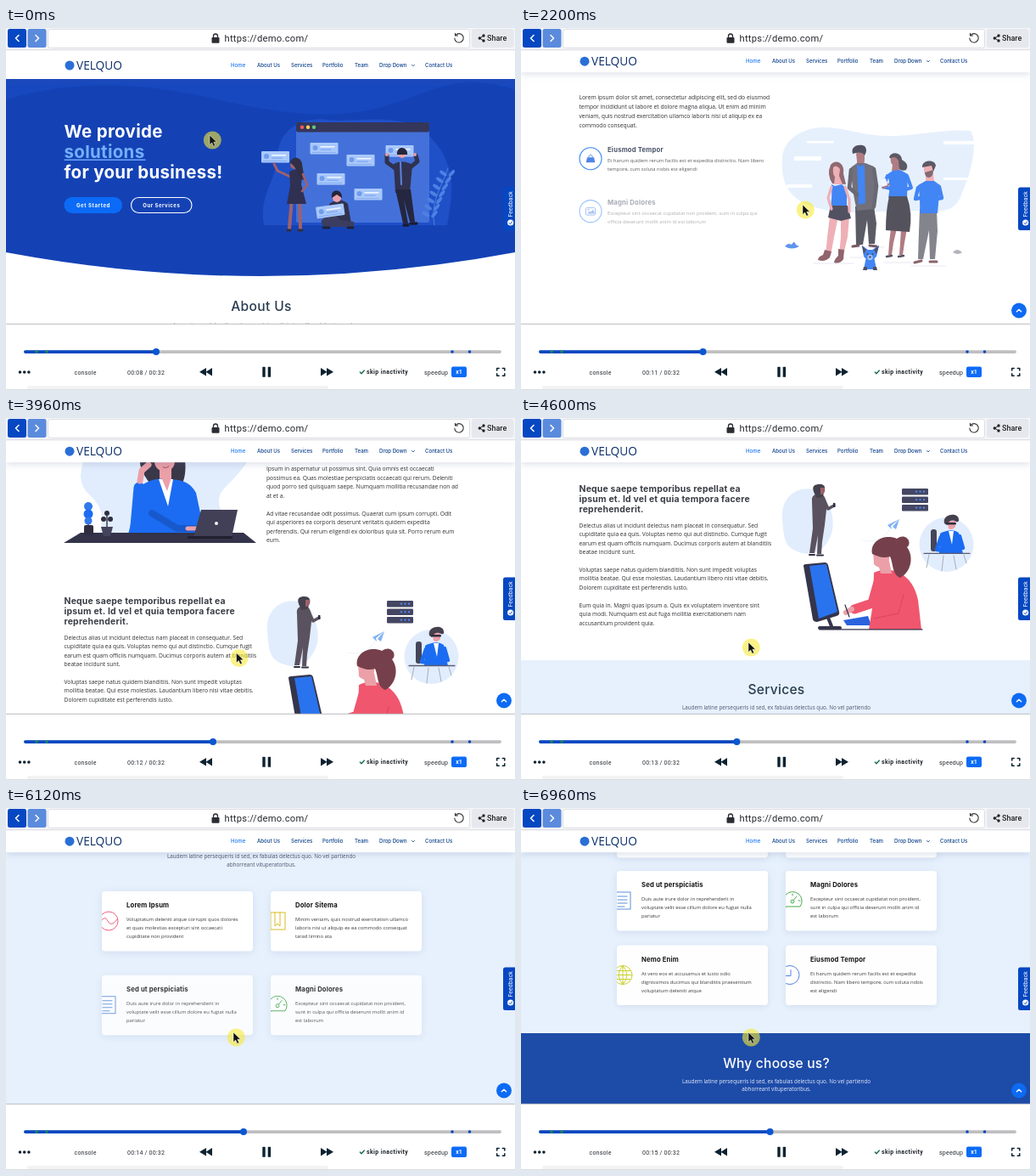
An HTML page that plays this animation: 600 px wide and 426 px high, repeating every 7000 ms.

```html
<!DOCTYPE html>
<html lang="en">
<head>
<meta charset="utf-8">
<title>Session replay</title>
<style>
html, body { margin: 0; width: 100%; height: 100%; overflow: hidden; background: #fff; }
svg { display: block; width: 100vw; height: 100vh; }
text { font-family: "Open Sans", sans-serif; white-space: pre; }
.h { font-family: Inter, sans-serif; }
.r { font-family: Roboto, sans-serif; }
.card { filter: drop-shadow(0 2px 5px rgba(60, 90, 140, .13)); }
.bar { filter: drop-shadow(0 2px 4px rgba(70, 90, 140, .2)); }
</style>
</head>
<body>
<svg id="stage" viewBox="0 0 600 426"></svg>
<script>
const BLUE = '#0b6bf7', DEEP = '#0647c2', NAVY = '#2f2e41', INK = '#26304a', SKIN = '#eba0a8', BROWN = '#a0616a', PALE = '#e1edfd', SHIRT = '#1b6cf2';

// Shape and text helpers; text y is the middle of the capitals.
const T = (x, y, s, size, more = '') =>
  `<text x="${x}" y="${y + size * .36}" font-size="${size}" ${more}>${s}</text>`;
const L = (x, y, lines, size, step, more) => lines.map((s, i) => T(x, y + i * step, s, size, more)).join('');
const P = (d, fill, more = '') => `<path d="${d}" fill="${fill}" ${more}/>`;
const S = (d, color, w = 1, more = '') =>
  `<path d="${d}" fill="none" stroke="${color}" stroke-width="${w}" stroke-linecap="round" stroke-linejoin="round" ${more}/>`;
const R = (x, y, w, h, fill, r = 0, more = '') =>
  `<rect x="${x}" y="${y}" width="${w}" height="${h}" rx="${r}" fill="${fill}" ${more}/>`;
const C = (x, y, r, fill, more = '') => `<circle cx="${x}" cy="${y}" r="${r}" fill="${fill}" ${more}/>`;
const G = (dy, s) => `<g transform="translate(0 ${dy})">${s}</g>`;
const fade = (start, dy, s) => `<g class="fade" data-start="${start}" data-dy="${dy}">${s}</g>`;
const head = (w, ls, fill, more = '') => `class="h" font-weight="${w}" letter-spacing="${ls}" fill="${fill}" ${more}`;
const MID = 'text-anchor="middle"';

function tag(x, y, turn = 0) {
  return `<g transform="translate(${x} ${y}) rotate(${turn})">` + R(0, 0, 33, 13.5, '#a9c8fb', 1) +
    C(6, 6, 3, '#6f9cec') + R(12, 4, 17, 1.5, '#f2f7ff') + R(12, 7.5, 13, 1.2, '#7fa8f0') + R(2, 11, 28, .8, '#7fa8f0') + '</g>';
}

function hero() {
  const leaves = [0, 1, 2, 3, 4, 5, 6].map(i => {
    const x = 500 + i * 2.5 + i * i * .15, y = 222 - i * 8;
    return `<ellipse cx="${x - 5}" cy="${y - 3}" rx="5" ry="2" transform="rotate(35 ${x - 5} ${y - 3})" fill="#4f80e2"/>` +
      `<ellipse cx="${x + 5}" cy="${y - 3}" rx="5" ry="2" transform="rotate(-50 ${x + 5} ${y - 3})" fill="#4f80e2"/>`;
  }).join('');
  return P('M0 60H600V264Q300 320 0 264Z', '#1442b5') +
    P('M0 84C90 58 170 66 250 84S400 112 470 84S560 62 600 72V60H0Z', '#1848c0') +
    P('M304 232C298 196 318 182 320 150S350 104 380 108S470 96 500 128S528 190 520 232Z', '#1f50c8') +
    T(68.5, 122, 'We provide', 20.5, head(700, .3, '#fff')) +
    T(68.5, 146, 'solutions', 20.5, head(700, .3, '#74b0fb')) + R(68.5, 154.5, 96, 1.4, '#74b0fb') +
    T(68.5, 170, 'for your business!', 20.5, head(700, .3, '#fff')) +
    R(68.5, 199, 68.5, 19, BLUE, 9.5) + T(103, 208.5, 'Get Started', 6, head(700, .6, '#fff', MID)) +
    R(147.5, 199.5, 71.5, 18, 'none', 9, 'stroke="#fff" stroke-width="1.1"') +
    T(183.3, 208.5, 'Our Services', 6, head(700, .5, '#fff', MID)) +
    R(342, 111, 157, 118, '#4a77dc', 2, 'opacity=".85"') + R(342, 111, 157, 11.5, '#34365a', 2) +
    C(349, 116.7, 2.2, '#fa5959') + C(356, 116.7, 2.2, '#fed253') + C(363, 116.7, 2.2, '#62c87b') +
    tag(358.5, 135) + tag(401.5, 149) + tag(366.5, 171) + tag(410.5, 189) + tag(447.5, 138) + tag(301, 145) +
    S('M505 232C500 205 512 190 521 165', '#4f80e2', 1) + leaves +
    // woman
    S('M335 175L320 168L316 160', BROWN, 3) + S('M337 200L334 236M346 200L347 236', BROWN, 4) +
    S('M332 238H335M345 238H349', NAVY, 3) + P('M334 169Q342 164 350 170L348 184L354 207H331L335 186Z', '#303052') +
    C(340, 161, 5, BROWN) + P('M335 159C336 150 348 151 349 160L352 179C344 178 344 163 335 159Z', '#302f45') + S('M350 172L355 185L349 192', BROWN, 2.6) +
    // seated man
    P('M381 207Q394 198 403 207L407 230H379Z', '#30324f') + C(390, 200, 5, SKIN) +
    P('M384 200C382 188 397 189 396 200L390 196Z', '#25263b') + P('M372 226Q385 214 394 226L410 228V234H380Q370 234 372 226Z', '#3b3d60') +
    S('M374 235H381M403 235H409', '#20223a', 3) + tag(365, 211, -8) +
    // man at the board
    S('M460 166L449 158V150M474 166L485 157L483 150', '#30324f', 5) + C(449, 149, 2, SKIN) + C(482, 149, 2, SKIN) +
    P('M457 160Q467 154 479 161L476 194H459Z', '#30324f') + C(467, 148, 5, SKIN) + P('M461 149C460 138 474 139 473 149Z', '#25263b') +
    S('M465 158L466 184', '#5d84df', 2) + P('M459 190H477L482 228H476L469 202L474 230H468Z', '#25263f') +
    S('M469 232H474M477 230H484', '#191b30', 3.4);
}

function itemIcon(i, y) {
  const art = [
    P(`M78 ${y - 1.5}H86L87.3 ${y + 4.5}H76.7Z`, '#2c6ce0') + S(`M79.8 ${y - 2}C79.8 ${y - 5.5} 84.2 ${y - 5.5} 84.2 ${y - 2}`, '#2c6ce0', .9),
    R(76.5, y - 4, 11, 8.5, 'none', 1, 'stroke="#2c6ce0"') + P(`M78 ${y + 3}L81 ${y}L82.5 ${y + 1}L85 ${y - 2}L87 ${y + 3}Z`, '#2c6ce0') + C(79.5, y - 1.8, 1, '#2c6ce0'),
    S(`M76.5 ${y - 5}V${y + 4.5}H88`, '#2c6ce0') + S(`M79 ${y + 2.5}V${y}M81.4 ${y + 2.5}V${y - 3}M83.8 ${y + 2.5}V${y - 1}M86.2 ${y + 2.5}V${y - 4}`, '#2c6ce0', 1.5)
  ];
  return C(82, y, 13, '#fff', `stroke="${BLUE}" stroke-width="1.1"`) + art[i];
}

function item(i, y, title, lines, start) {
  return fade(start, 43, itemIcon(i, y + 10.3) + T(102, y, title, 7.7, head(700, .2, INK)) +
    L(102, y + 12.2, lines, 5.87, 10.4, 'fill="#3a3a3a"'));
}

function team() {
  return P('M308 118C310 95 335 82 360 83S400 92 430 93S500 84 530 87C538 100 533 130 520 160C512 186 490 182 460 181S385 188 350 178S306 150 308 118Z', PALE) +
    R(322, 117, 32, 5, '#fff', 1) + R(337, 99, 32, 2.5, '#fff', 1) + R(498, 99, 40, 4, '#fff', 1) + R(313, 150, 30, 4, '#fff', 1) + R(498, 142, 30, 3, '#fff', 1) +
    S('M345 243H392M388 236H402M428 242H460M460 246H500M388 224H428', '#eceef5', 1.4) +
    P('M311 223Q315 218 319 221Q322 215 324 221L328 223Q319 228 311 223Z', '#3d80ec') + P('M509 230Q514 224 520 230Q515 234 509 230Z', '#a4a6ad') +
    // girl
    P('M364 188H374L369 212L365 234H359L361 212ZM377 188H387L385 212L380 233H375L377 212Z', SKIN) +
    P('M358 227L366 229L364 236Q358 242 350 239Q350 235 356 233Z', '#7b4450') + P('M374 226L381 227L380 238Q376 244 369 242Q370 237 374 234Z', '#7b4450') +
    P('M365 127C372 119 382 126 380 137L383 150L367 149Q360 138 365 127Z', '#7b4a55') + P('M368 130Q372 126 376 132L375 140L379 150H369L370 141Q367 138 368 130Z', SKIN) +
    P('M366 150L370 152L378 150L384 155L384 177H365Q367 162 366 150Z', SHIRT) + P('M365 175H385L389 190L377 193L362 189Z', NAVY) +
    S('M366 153L362 166L366 179M382 153L387 168L387 182', SKIN, 3.2) +
    // man in jacket
    P('M394 176H416L419 196L417 220H410L408 192L403 221H395Z', '#3a3946') + S('M391 223L398 222M411 222L419 223', '#593b45', 3) +
    P('M395 114Q399 108 405 112L405 121L404 129H396V122Z', BROWN) + P('M391 114C388 104 400 102 405 105Q409 109 405 116Q402 110 391 114Z', NAVY) +
    P('M389 130L396 125L406 125L416 129Q421 140 418 152L417 179L396 181Q390 158 389 130Z', '#55535f') + P('M396 126L400 129L405 126L406 172L398 174Z', SHIRT) +
    S('M389 133L387 154L396 162M416 132L419 152L416 176', '#4b4956', 4.6) +
    // woman in skirt
    P('M436 202H443L439 219L437 233H433L434 219ZM448 202H455L452 219L450 233H446L447 219Z', BROWN) + S('M431 235L437 234M445 235L451 234', NAVY, 2.4) +
    P('M434 118C437 110 449 113 449 121Q458 126 454 133Q446 136 442 126Z', '#3b3846') + P('M436 119Q441 116 445 122L446 134H437L438 127Q435 125 436 119Z', BROWN) +
    P('M432 138L438 134L447 133L456 138L455 166H433Q436 151 432 138Z', SHIRT) + P('M434 164H455Q462 184 458 206L430 204Q430 181 434 164Z', '#302f3c') +
    S('M432 140L427 153L441 156M455 140L460 154L447 158', SHIRT, 4) + S('M427 154L433 150', BROWN, 3) + P('M423 145L430 143L432 151L425 153Z', '#eef3fd') +
    // man in sweater
    P('M470 180H490L491 205L488 238H482L481 204L474 238H468L469 206Z', '#6b6b76') + S('M464 242L472 240M482 241L490 241', '#70454b', 3) +
    P('M475 128Q481 122 486 129L486 137L487 146H477V139Q474 135 475 128Z', SKIN) + P('M473 130C472 121 488 120 489 128L486 135L484 128Z', '#3b3846') + P('M476 136L486 133Q486 142 480 142Q476 141 476 136Z', '#6a4c58') +
    P('M468 151L477 146L487 146L494 151L491 184H470Q471 166 468 151Z', SHIRT) + S('M468 154L465 167L482 164M493 153L496 166L479 169', SHIRT, 4.4) +
    // dog
    P('M407 235H416L419 250H404Z', SHIRT) + P('M402 222L409 227H414L422 222L419 235Q411 243 404 235Z', SHIRT) +
    P('M402 222L407 227L404 232ZM422 222L416 227L419 232ZM404 247H408V251H403ZM415 247H419L420 251H415Z', NAVY) +
    C(411.5, 236, 3.2, '#8db8f7') + C(408.5, 232, 1.1, NAVY) + C(414.5, 232, 1.1, NAVY) + C(411.5, 235.5, 1.3, NAVY);
}

function deskWoman() {
  return P('M88 68C92 20 130 24 165 26S250 22 276 30S276 64 258 82S262 118 262 137H110Q120 110 100 92Q88 82 88 68Z', PALE) +
    P('M161 40C166 20 203 18 207 38C214 48 212 72 207 78L169 76C160 64 154 52 161 40Z', '#3a3749') +
    C(187, 51, 12, SKIN) + R(181, 58, 14, 20, SKIN) + P('M172 50C176 34 202 32 203 50Q188 38 172 50Z', '#3a3749') + S('M185 58Q189 60 192 57', '#a84f5c') +
    P('M158 80Q178 68 190 73Q214 70 224 88L233 130L228 137H144Z', SHIRT) + P('M180 72H197L191 104Z', '#fff') + P('M183 70H195L190 86Z', SKIN) +
    S('M153 127L157 82', SHIRT, 13) + S('M158 74L160 62L168 55', SKIN, 7) + S('M172 112L202 130H222', '#1759cd', 8) + S('M214 130H230', SKIN, 5) +
    P('M88 135H280L295 147H68Z', '#33334a') +
    P('M230 108H273L266 140H221Z', '#414057') + C(248, 124, 2, '#f2f2f7') + R(214, 139, 53, 3, '#20202f', 1) +
    S('M97 137V108', NAVY, 1.4) + C(97, 104, 5, '#3379eb') + C(97, 113, 5.5, SHIRT) + C(97, 121, 4.5, '#3379eb') + R(92, 126, 11, 12, NAVY, 2) +
    S('M119 132V113', NAVY, 1.4) + C(119, 112, 3, NAVY) + C(115, 119, 3, NAVY) + C(123, 119, 3, NAVY) + P('M112 128H126L123 139H115Z', '#44445c');
}

function remoteWork() {
  const racks = [215, 224.5, 234].map(y => R(449, y, 31, 7.5, '#454662', 1.2) +
    C(466, y + 3.7, 1.1, '#4c8df8') + C(470.5, y + 3.7, 1.1, '#4c8df8') + C(475, y + 3.7, 1.1, '#4c8df8')).join('');
  return P('M308 250C306 225 326 212 344 216S372 250 366 268S346 296 328 290S310 274 308 250Z', PALE) +
    P('M343 230Q342 224 347 222L356 222Q361 228 360 240L358 258L355 278L354 292H349L350 270L346 291H340L344 262Z', '#5a525e') +
    P('M346 221Q341 211 350 210Q360 209 358 218L355 225L348 226Z', '#46414e') + P('M353 214L358 214L357 221L353 222Z', BROWN) +
    S('M357 228L362 239L369 235', '#5a525e', 3.4) + S('M340 293H346M349 293.5H356', NAVY, 2) + R(368, 232, 2.4, 5, NAVY) +
    racks + P('M432 258L446 251L442 263L438 260L446 251L436 259L437 263Z', '#7fb1f4') + S('M434 264Q424 280 402 276', '#dfe8f5', .7, 'stroke-dasharray="2 2"') +
    C(501.5, 281, 32, PALE) + R(483, 263, 7, 26, '#44465a', 3) + P('M494 268Q507 261 516 267L521 292H493Z', SHIRT) + P('M504 265H510L508 281Z', '#fff') +
    P('M502 253H512L512 260Q508 265 504 262Z', SKIN) + P('M499 256C496 245 515 242 516 251Q517 255 513 254Q506 250 502 258Z', '#46414e') + R(501, 255, 12, 2.6, NAVY, 1) +
    S('M495 272L490 287L503 288M517 271L521 285', SHIRT, 4.4) + S('M475 291.5H529', '#5a5c70', 1.3) + S('M481 293L478 308M522 293L525 303M498 294L496 312M510 294L513 310', '#a9adbd', 1) +
    P('M333 306Q333 304 336 304L358 302Q361 302 362 305L375 360Q376 364 372 365L349 372Q345 372 344 369Z', '#34354b') + P('M340 306L360 304L373 360L351 368Z', '#2a73ee') +
    S('M362 367L366 377M352 379H376', '#34354b', 4) + P('M380 370L409 365L413 376H384Z', '#2a63dd') +
    P('M416 314Q430 307 446 314Q463 323 468 346L472 381H410L415 350Z', '#f0566e') + S('M421 325L414 350L393 357', '#f0566e', 11) + S('M390 357L383 361', SKIN, 6) + S('M382 352L387 366', NAVY, 1.2) +
    P('M421 304L434 300L437 315H424Z', SKIN) + P('M415 288Q425 282 435 290L433 306Q422 311 416 304Z', SKIN) +
    P('M414 292C411 277 428 268 443 274C454 266 462 279 455 284C464 296 459 314 447 320C437 316 439 303 435 295C427 298 419 294 414 292Z', '#75404c') + S('M451 340L445 362L416 368', '#d7475f', 1) +
    S('M352 381H473', '#34354b', 1.2);
}

const CARD_ICONS = [
  y => C(121, y, 11, 'none', 'stroke="#f0627f"') + S(`M111 ${y + 2}Q116 ${y - 8} 120 ${y}T131 ${y - 2}`, '#f0627f'),
  y => R(107, y - 10, 23, 20, 'none', 0, 'stroke="#d8bd22"') + S(`M118 ${y - 10}V${y + 6}L121 ${y + 3}L124 ${y + 6}V${y - 10}M113 ${y - 10}V${y + 10}`, '#d8bd22'),
  y => R(107, y - 10, 22, 20, 'none', 0, 'stroke="#5a8fd8"') + S(`M114 ${y - 5}H125M114 ${y - 1}H125M114 ${y + 3}H125M114 ${y + 7}H122`, '#5a8fd8'),
  y => S(`M113 ${y + 8}A11 11 0 1 1 130 ${y + 7}H113M121 ${y + 1}L126 ${y - 5}M121 ${y - 8}V${y - 6}M130 ${y}H128`, '#49a94f') + C(121, y + 1, 2, '#fff', 'stroke="#49a94f"'),
  y => C(120, y, 11, 'none', 'stroke="#c9d02a"') + S(`M109 ${y}H131M111 ${y - 5}H129M111 ${y + 5}H129M120 ${y - 11}V${y + 11}M120 ${y - 11}Q110 ${y} 120 ${y + 11}Q130 ${y} 120 ${y - 11}`, '#c9d02a'),
  y => C(118, y, 11, 'none', 'stroke="#5182e0"') + S(`M119 ${y - 6}V${y + 1}H113`, '#5182e0')
];

function card(i, title, lines) {
  const dx = i % 2 * 199, y = 1105 + (i >> 1) * 86, start = [4950, 5540, 6120][i >> 1];
  return fade(start, 86, `<g transform="translate(${dx} 0)">` + R(113, y, 178, 70.5, '#fff', 4, 'class="card"') +
    `<g clip-path="url(#half)">${CARD_ICONS[i](y + 35)}</g>` + T(142, y + 16.7, title, 7.7, head(700, .16, '#111')) +
    L(142, y + 33, lines, 5.87, 10.1, 'fill="#3a3a3a"') + '</g>');
}

const LAUDEM = ['Laudem latine persequeris id sed, ex fabulas delectus quo. No vel partiendo', 'abhorreant vituperatoribus.'];
const BODY = 'fill="#2e3034"';

const page =
  R(0, 26, 600, 1500, '#fff') + hero() +
  T(301, 327, 'About Us', 15.6, head(500, .35, '#283d50', MID)) +
  L(303, 349.5, ['Lorem ipsum dolor sit amet, consectetur adipiscing elit, sed do eiusmod', 'tempor incididunt ut labore et dolore magna aliqua.'], 6.3, 10, `fill="#556" ${MID}`) +
  L(68.5, 405, ['Lorem ipsum dolor sit amet, consectetur adipiscing elit, sed do eiusmod', 'tempor incididunt ut labore et dolore magna aliqua. Ut enim ad minim',
    'veniam, quis nostrud exercitation ullamco laboris nisi ut aliquip ex ea', 'commodo consequat.'], 6.72, 10.9, BODY) +
  item(0, 459, 'Eiusmod Tempor', ['Et harum quidem rerum facilis est et expedita distinctio. Nam libero', 'tempore, cum soluta nobis est eligendi'], 1650) +
  item(1, 502.7, 'Magni Dolores', ['Excepteur sint occaecat cupidatat non proident, sunt in culpa qui', 'officia deserunt mollit anim id est laborum'], 1990) +
  item(2, 548, 'Dolor Sitema', ['Minim veniam, quis nostrud exercitation ullamco laboris nisi ut aliquip', 'ex ea commodo consequat tarad limino ata'], 2220) +
  fade(1650, 174, G(327, team())) +
  fade(2220, 40, G(591, deskWoman())) +
  fade(2220, 40, L(307, 620, ['Voluptatem dignissimos provident quasi', 'corporis voluptates sit assumenda.'], 10.4, 11.8, head(700, .22, '#3a3d45')) +
    L(307, 651, ['Ipsum in aspernatur ut possimus sint. Quia omnis est occaecati', 'possimus ea. Quas molestiae perspiciatis occaecati qui rerum. Deleniti',
      'quod porro sed quisquam saepe. Numquam mollitia recusandae non ad', 'at et a.', '', 'Ad vitae recusandae odit possimus. Quaerat cum ipsum corrupti. Odit',
      'qui asperiores ea corporis deserunt veritatis quidem expedita', 'perferendis. Qui rerum eligendi ex doloribus quia sit. Porro rerum eum', 'eum.'], 6.72, 10.45, BODY)) +
  fade(2950, 40, L(68.5, 806.5, ['Neque saepe temporibus repellat ea', 'ipsum et. Id vel et quia tempora facere', 'reprehenderit.'], 10.4, 11.8, head(700, .22, '#3a3d45')) +
    L(68.5, 849.3, ['Delectus alias ut incidunt delectus nam placeat in consequatur. Sed', 'cupiditate quia ea quis. Voluptas nemo qui aut distinctio. Cumque fugit',
      'earum est quam officiis numquam. Ducimus corporis autem at blanditiis', 'beatae incidunt sunt.', '', 'Voluptas saepe natus quidem blanditiis. Non sunt impedit voluptas',
      'mollitia beatae. Qui esse molestias. Laudantium libero nisi vitae debitis.', 'Dolorem cupiditate est perferendis iusto.', '',
      'Eum quia in. Magni quas ipsum a. Quis ex voluptatem inventore sint', 'quia modi. Numquam est aut fuga mollitia exercitationem nam', 'accusantium provident quia.'], 6.72, 10.45, BODY)) +
  fade(2950, 40, G(591, remoteWork())) +
  R(0, 1008, 600, 374, '#e7f1fd') + T(301, 1042, 'Services', 15.6, head(500, .25, '#283d50', MID)) +
  L(301, 1064, LAUDEM, 6.3, 9.5, `fill="#48536a" ${MID}`) +
  card(0, 'Lorem Ipsum', ['Voluptatum deleniti atque corrupti quos dolores', 'et quas molestias excepturi sint occaecati', 'cupiditate non provident']) +
  card(1, 'Dolor Sitema', ['Minim veniam, quis nostrud exercitation ullamco', 'laboris nisi ut aliquip ex ea commodo consequat', 'tarad limino ata']) +
  card(2, 'Sed ut perspiciatis', ['Duis aute irure dolor in reprehenderit in', 'voluptate velit esse cillum dolore eu fugiat nulla', 'pariatur']) +
  card(3, 'Magni Dolores', ['Excepteur sint occaecat cupidatat non proident,', 'sunt in culpa qui officia deserunt mollit anim id', 'est laborum']) +
  card(4, 'Nemo Enim', ['At vero eos et accusamus et iusto odio', 'dignissimos ducimus qui blanditiis praesentium', 'voluptatum deleniti atque']) +
  card(5, 'Eiusmod Tempor', ['Et harum quidem rerum facilis est et expedita', 'distinctio. Nam libero tempore, cum soluta nobis', 'est eligendi']) +
  R(0, 1382, 600, 140, '#1d4ba8') + T(301, 1417, 'Why choose us?', 15.6, head(500, .2, '#fff', MID)) +
  L(301, 1439, LAUDEM, 6.3, 9.2, `fill="#e8effc" ${MID}`);

const links = [[265, 'Home'], [296, 'About Us'], [336, 'Services'], [373, 'Portfolio'], [411, 'Team'], [440, 'Drop Down'], [494, 'Contact Us']];
const nav = R(0, 18, 600, 42, '#fff', 0, 'class="bar"') + C(75, 44, 5.5, '#2a6fd6') + T(83, 44, 'VELQUO', 13.7, 'fill="#0c2f6b"') +
  links.map(([x, s], i) => T(x, 44, s, 6.1, head(500, 0, i ? '#0a3f8a' : '#1a76f0'))).join('') + S('M478.5 43.2L480 44.8L481.5 43.2', '#0a3f8a', .8);

const skip = x => P(`M${x} 404.7L${x + 8} 400V409.5ZM${x + 7.5} 404.7L${x + 15} 400V409.5Z`, '#0c2231');
const topBar = R(0, 0, 600, 26, '#f4f5f8') + S('M0 25.8H600', '#d4d5da', .8) + R(2, 1, 22, 22, DEEP, 2.5) + R(25.5, 1, 22, 22, '#5b8bdc', 2.5) +
  S('M15 8.5L11.5 12L15 15.5M35 8.5L38.5 12L35 15.5', '#fff', 1.6) + R(49.5, 1.5, 497, 22, '#fff', 3, 'stroke="#d5d7dd" stroke-width=".8"') +
  R(242.5, 11, 9, 6.8, '#2b2d33', 1) + S('M244.5 11V9.5A2.5 2.5 0 0 1 249.5 9.5V11', '#2b2d33', 1.3) +
  T(257.5, 12.3, 'https://demo.com/', 11.2, 'class="r" letter-spacing=".27" fill="#26282d"') +
  S('M530 8.5A5.2 5.2 0 1 1 528.8 12M529.5 6.2V9H532.5', '#333', 1.1) + R(549, 1, 49.5, 22, '#e6e8ee', 3) +
  S('M563 9L558.5 12L563 15', '#222', 1) + C(563, 9, 1.7, '#222') + C(558.3, 12, 1.7, '#222') + C(563, 15, 1.7, '#222') +
  T(567, 12, 'Share', 9, 'class="r" font-weight="500" fill="#222"');

const side = P('M600 187.5H588.5Q586 187.5 586 190V235.5Q586 238 588.5 238H600Z', DEEP) +
  `<text class="r" transform="translate(597 222.5) rotate(-90)" font-size="6.9" letter-spacing=".1" fill="#fff">Feedback</text>` +
  C(594.7, 229, 3.6, '#fff') + S('M593 229.5L594.5 230.8L596.5 227.8', DEEP, .9);

const RTXT = 'class="r" letter-spacing=".22" fill="#252a31"';
const panel = R(0, 348, 600, 78, '#fff') + S('M0 348.3H600', '#b4b5b8', .9) +
  R(25, 421, 355, 4, '#f3f3f3', 2) + S('M0 425.5H600', '#dcdde0', 1) +
  R(21, 379.3, 563, 3.6, '#bfbfc1', 1.8) + `<rect id="fill" x="21" y="379.3" height="3.6" rx="1.8" fill="${DEEP}"/>` +
  C(36, 381, 1.8, '#178c5a') + C(48, 381, 1.8, '#178c5a') + C(526, 381, 1.8, DEEP) + C(546.5, 381, 1.8, DEEP) +
  `<circle id="knob" cy="381" r="4" fill="#0b57d0"/>` +
  [16.5, 21.7, 26.9].map(x => C(x, 405, 1.8, '#0c2231')).join('') + T(80.5, 405, 'console', 7, RTXT) +
  `<text id="clock" x="143" y="407.5" font-size="7" ${RTXT}></text>` +
  skip(228) + `<g transform="translate(614 0) scale(-1 1)">${skip(228)}</g>` + R(302.3, 398.8, 3.4, 12, '#0c2231', .6) + R(308.7, 398.8, 3.4, 12, '#0c2231', .6) +
  S('M417.3 405L419 406.8L422.3 403', '#15684e', 1.3) + T(425, 405, 'skip inactivity', 6.9, 'class="r" font-weight="700" letter-spacing=".42" fill="#1c2229"') +
  T(493, 405, 'speedup', 7, RTXT) + R(525, 398.5, 18, 12.5, BLUE, 2) + T(534, 404.8, 'x1', 7, `class="r" font-weight="700" fill="#fff" ${MID}`) +
  S('M578.7 403V400.5H581.2M585.3 400.5H587.8V403M587.8 406.8V409.3H585.3M581.2 409.3H578.7V406.8', '#0c2231', 1.5);

const pointer = C(3.3, 6, 10.5, '#f6e936', 'opacity=".6"') +
  P('M0 0V11.5L2.7 9L4.6 13.2L6.7 12.2L4.8 8.2H8.4Z', '#111', 'stroke="#fff" stroke-width=".5"');

const $ = id => document.getElementById(id);
$('stage').innerHTML = '<defs><clipPath id="view"><path d="M0 26H600V348H0Z"/></clipPath><clipPath id="half"><path d="M113 1000H160V1500H113Z"/></clipPath></defs>' +
  R(0, 0, 600, 426, '#fff') + `<g clip-path="url(#view)"><g id="page">${page}</g><g id="nav">${nav}</g>` +
  `<g id="up">${C(587, 332.5, 9, '#0d6af2')}${S('M584.3 333.8L587 331.2L589.7 333.8', '#fff', 1.3)}</g></g>` +
  side + topBar + panel + `<g id="pointer">${pointer}</g>`;
const fades = [...document.querySelectorAll('.fade')];

const linear = u => u;
const out = u => 1 - (1 - u) ** 3;
const smooth = u => u * u * (3 - 2 * u);
const clamp = u => Math.max(0, Math.min(1, u));

// Steps are [time, value, easing used to arrive].
const SCROLL = [[0, 0], [1480, 0], [2200, 323, out], [3000, 327, out], [3100, 327], [3900, 591, out], [4360, 591], [5160, 792, out],
  [5400, 792], [5800, 900], [6120, 1007], [6640, 1117, out], [7000, 1117]];
const MOUSE_X = [[0, 240], [300, 240], [1300, 332, smooth], [2240, 332], [2920, 278, smooth], [3800, 272, smooth], [4600, 268, smooth], [7000, 268]];
const MOUSE_Y = [[0, 126], [300, 126], [1300, 208, smooth], [2240, 208], [2920, 239, smooth], [3800, 278, smooth], [4600, 264, smooth], [7000, 264]];
const HEAD = [[0, 177], [2200, 214.5], [3000, 228.5], [3960, 244], [5240, 264.7], [6120, 280], [7000, 294.2]];

function at(steps, t) {
  const i = Math.max(1, steps.findIndex(s => s[0] >= t));
  const [t0, a] = steps[i - 1], [t1, b, ease = linear] = steps[i];
  return a + (b - a) * ease((t - t0) / (t1 - t0));
}

function draw(t) {
  const y = at(SCROLL, t), x = at(HEAD, t), shrink = smooth(clamp((y - 20) / 40));
  $('page').setAttribute('transform', `translate(0 ${-y})`);
  $('nav').setAttribute('transform', `translate(0 ${-4.8 * shrink})`);
  $('nav').firstChild.setAttribute('height', 42 - 3 * shrink);
  $('up').setAttribute('opacity', shrink);
  $('pointer').setAttribute('transform', `translate(${at(MOUSE_X, t)} ${at(MOUSE_Y, t)})`);
  $('fill').setAttribute('width', x - 21);
  $('knob').setAttribute('cx', x);
  $('clock').textContent = `00:${String(Math.floor(8.84 + t / 1000)).padStart(2, '0')} / 00:32`;
  for (const el of fades) {
    const e = 1 - (1 - clamp((t - el.dataset.start) / 1000)) ** 2.2;
    el.setAttribute('transform', `translate(0 ${el.dataset.dy * (1 - e)})`);
    el.setAttribute('opacity', e);
  }
}

const begin = performance.now();
function tick() {
  const t = (performance.now() - begin) % 7000;
  draw(Math.floor(t / 40) * 40);
  requestAnimationFrame(tick);
}
tick();
</script>
</body>
</html>
```
